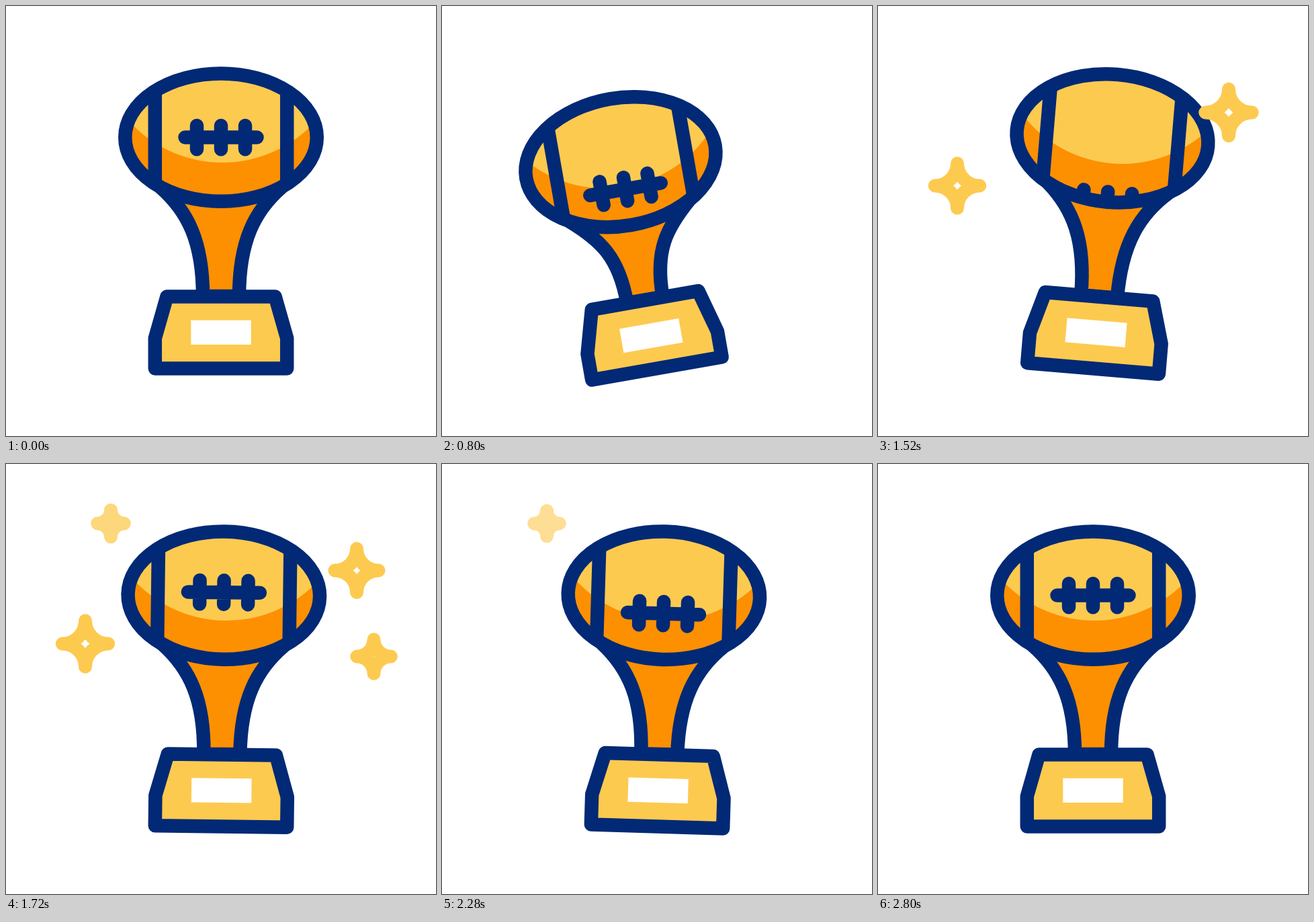
An HTML page with a canvas that plays this animation: 640x640 px, repeating every 3 s.

```html
<!DOCTYPE html>
<html lang="en">
<head>
<meta charset="utf-8">
<title>Football trophy</title>
<style>
  html, body { margin: 0; height: 100%; overflow: hidden; background: #fff; }
  canvas { display: block; }
</style>
</head>
<body>
<canvas id="stage" width="640" height="640"></canvas>
<script>
const ctx = document.getElementById('stage').getContext('2d');
const LOOP = 3000;
const NAVY = '#022975', YELLOW = '#fdca50', ORANGE = '#fd9000';
const LINE = 20.5;

// Keys are [time, value] pairs
const SWING = [[200, 0], [780, -10], [1480, 5], [1940, -3], [2425, 3], [2800, 0]];
const SQUASH = [[200, 0], [780, 1], [1300, 0]];
const SAG = [[780, 0], [1170, 5], [1500, 0]];
const ROLL = [[200, 0], [780, 42], [1190, -121], [1520, -242], [1960, -480], [2280, -653], [2640, -680]];
const ROLL_PERIOD = 340;
const DROP = 32;

const STARS = [
  { x: 522, y: 158.5, start: 1180, end: 1960 },
  { x: 118, y: 267.5, start: 1210, end: 1984 },
  { x: 547.5, y: 286.5, start: 1520, end: 2216 },
  { x: 156, y: 88.5, start: 1590, end: 2374 },
];

const clamp = v => Math.min(1, Math.max(0, v));
const smooth = v => { const u = clamp(v); return u * u * (3 - 2 * u); };

// Monotone cubic curve through the keys; it comes to rest at every turning point
function track(keys, t) {
  const last = keys.length - 1;
  if (t <= keys[0][0]) return keys[0][1];
  if (t >= keys[last][0]) return keys[last][1];
  const i = keys.findIndex(k => k[0] > t) - 1;
  const rate = j => (keys[j + 1][1] - keys[j][1]) / (keys[j + 1][0] - keys[j][0]);
  const slope = j => {
    if (j === 0 || j === last) return 0;
    const a = rate(j - 1), b = rate(j);
    return a * b > 0 ? 2 * a * b / (a + b) : 0;
  };
  const [t0, v0] = keys[i], [t1, v1] = keys[i + 1];
  const h = t1 - t0, u = (t - t0) / h, s = smooth(u);
  return v0 + (v1 - v0) * s
    + h * u * (1 - u) * ((1 - u) * slope(i) - u * slope(i + 1));
}

function paint(path, fill) {
  if (fill) {
    ctx.fillStyle = fill;
    ctx.fill(path);
  }
  ctx.stroke(path);
}

function drawNeck(squash) {
  const drop = DROP * squash, foot = -108 + 4 * squash;
  const top = -270 + drop, bend = -235 + drop, hip = -190 + drop / 2;
  const neck = new Path2D();
  neck.moveTo(-90, top);
  neck.bezierCurveTo(-50, bend, -27, hip, -27, foot);
  neck.lineTo(27, foot);
  neck.bezierCurveTo(27, hip, 50, bend, 90, top);
  paint(neck, ORANGE);
}

function drawBase(squash) {
  const top = -107.6 + 4 * squash, kink = -45.5 + 6 * squash;
  const base = new Path2D();
  [[-98.2, -0.5], [-98.2, kink], [-80.5, top], [80.5, top], [98.2, kink], [98.2, -0.5]]
    .forEach(([x, y]) => base.lineTo(x, y));
  base.closePath();
  paint(base, YELLOW);
  ctx.fillStyle = '#fff';
  ctx.fillRect(-44.7, -72.3 + 4 * squash, 89.4, 36.3);
}

function drawBall(roll, sag) {
  const ball = new Path2D();
  ball.ellipse(0, 0, 142.75, 95.2, 0, 0, 2 * Math.PI);

  ctx.save();
  ctx.clip(ball);
  ctx.fillStyle = ORANGE;
  ctx.fill(ball);
  ctx.fillStyle = YELLOW;
  ctx.beginPath();
  ctx.arc(2, -149.6 + sag, 187, 0, 2 * Math.PI);
  ctx.fill();

  const seams = new Path2D();
  for (const x of [-98.2, 98.2]) {
    seams.moveTo(x, -90);
    seams.lineTo(x, 90);
  }
  seams.moveTo(-53.5, roll);
  seams.lineTo(53.5, roll);
  for (const x of [-36, 0, 36]) {
    seams.moveTo(x, roll - 17.7);
    seams.lineTo(x, roll + 17.7);
  }
  paint(seams);
  ctx.restore();

  paint(ball);
}

function drawStar({ x, y, start, end }, t) {
  const p = smooth((t - start) / 400) * smooth((end - t) / 320);
  if (p === 0) return;
  const r = 36 * (0.4 + 0.6 * p);
  const star = new Path2D();
  star.moveTo(0, -r);
  star.arc(r, -r, r, Math.PI, Math.PI / 2, true);
  star.arc(r, r, r, -Math.PI / 2, -Math.PI, true);
  star.arc(-r, r, r, 0, -Math.PI / 2, true);
  star.arc(-r, -r, r, Math.PI / 2, 0, true);
  star.closePath();

  ctx.save();
  ctx.translate(x, y);
  ctx.globalAlpha = Math.min(1, 3 * p);
  ctx.strokeStyle = YELLOW;
  ctx.lineWidth = 20;
  paint(star);
  ctx.restore();
}

function draw(t) {
  const squash = track(SQUASH, t);
  const half = ROLL_PERIOD / 2;
  const roll = (track(ROLL, t) + half + 2 * ROLL_PERIOD) % ROLL_PERIOD - half;

  ctx.fillStyle = '#fff';
  ctx.fillRect(0, 0, 640, 640);
  ctx.lineCap = ctx.lineJoin = 'round';
  ctx.strokeStyle = NAVY;
  ctx.lineWidth = LINE;

  ctx.save();
  ctx.translate(320, 540);
  ctx.rotate(track(SWING, t) * Math.PI / 180);
  drawNeck(squash);
  drawBase(squash);
  ctx.translate(0, -344.4 + DROP * squash);
  drawBall(roll, track(SAG, t));
  ctx.restore();

  STARS.forEach(star => drawStar(star, t));
}

function tick() {
  draw(performance.now() % LOOP);
  requestAnimationFrame(tick);
}
tick();
</script>
</body>
</html>
```
